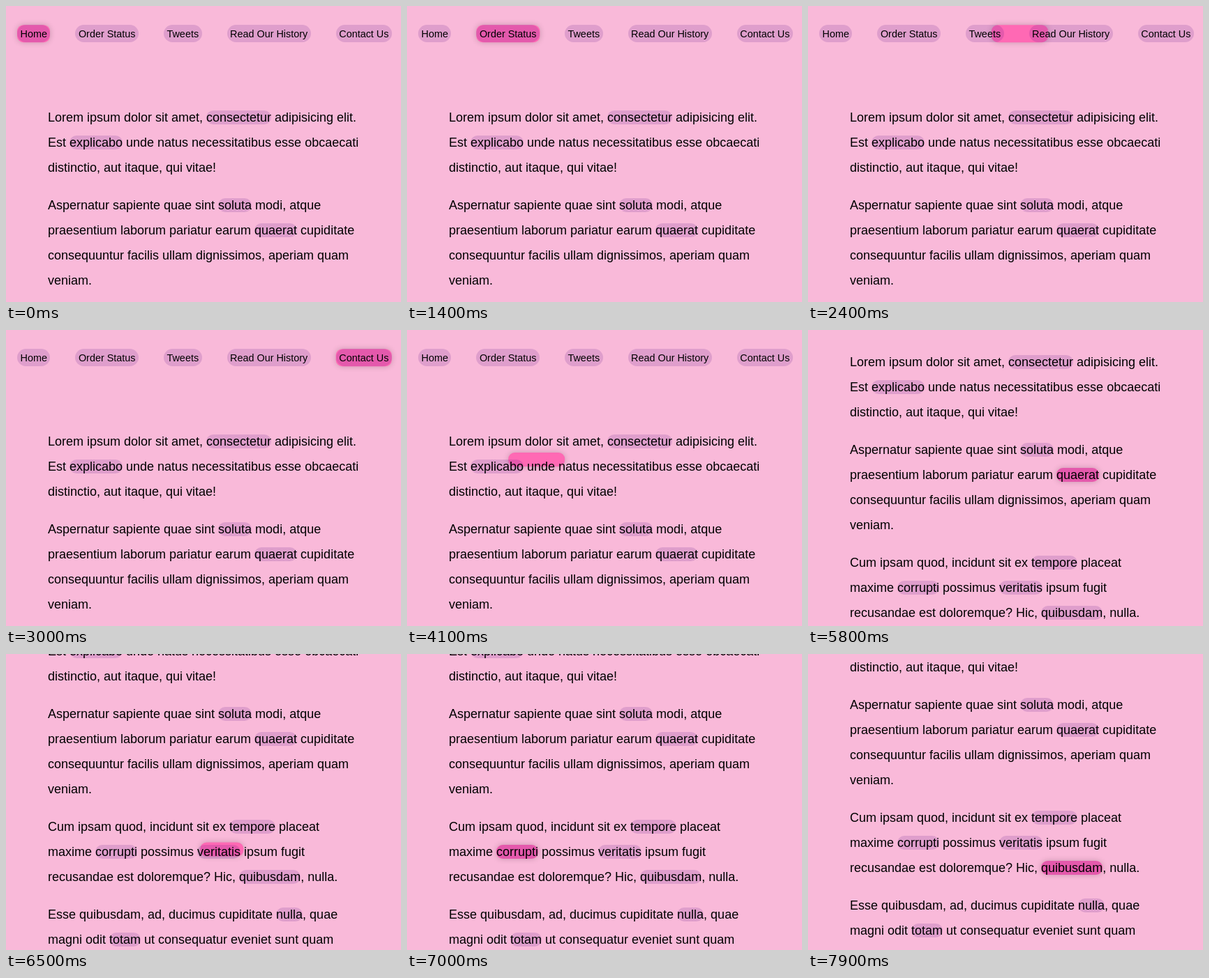
Recreate the animation shown at these times as an HTML page. Size 566 by 425 pixels, loop 8000 ms.

```html
<!DOCTYPE html>
<html lang="en">
<head>
<meta charset="utf-8">
<title>Follow-along links</title>
<style>
  html, body { margin: 0; width: 100%; height: 100%; overflow: hidden; background: #f9b9d9; }
  body { position: relative; font: 18px/36px "Liberation Sans", Arial, sans-serif; color: #000; }
  #page { position: absolute; left: 0; top: 0; width: 566px; height: 700px; isolation: isolate; }
  nav { position: absolute; left: 16px; top: 27.2px; display: flex; gap: 36px; font-size: 14.4px; line-height: 16px; white-space: nowrap; }
  nav a { padding: 4.5px; }
  main { position: absolute; left: 59.9px; top: 142px; white-space: nowrap; }
  p { margin: 0 0 18px; }
  a { color: #000; background: rgba(75, 0, 130, .15); border-radius: 18px; }
  #glow { position: absolute; left: 0; top: 0; z-index: -1; background: #ff69b4; border-radius: 9px; box-shadow: 0 0 9px rgba(0, 0, 0, .2); }
</style>
</head>
<body>
<div id="page">
  <div id="glow"></div>
  <nav><a>Home</a><a>Order Status</a><a>Tweets</a><a>Read Our History</a><a>Contact Us</a></nav>
  <main>
    <p>Lorem ipsum dolor sit amet, <a>consectetur</a> adipisicing elit.<br>
      Est <a>explicabo</a> unde natus necessitatibus esse obcaecati<br>
      distinctio, aut itaque, qui vitae!</p>
    <p>Aspernatur sapiente quae sint <a>soluta</a> modi, atque<br>
      praesentium laborum pariatur earum <a>quaerat</a> cupiditate<br>
      consequuntur facilis ullam dignissimos, aperiam quam<br>
      veniam.</p>
    <p>Cum ipsam quod, incidunt sit ex <a>tempore</a> placeat<br>
      maxime <a>corrupti</a> possimus <a>veritatis</a> ipsum fugit<br>
      recusandae est doloremque? Hic, <a>quibusdam</a>, nulla.</p>
    <p>Esse quibusdam, ad, ducimus cupiditate <a>nulla</a>, quae<br>
      magni odit <a>totam</a> ut consequatur eveniet sunt quam</p>
  </main>
</div>
<script>
const LOOP = 8000, TICK = 100, MOVE = 200;
const page = document.getElementById('page');
const glow = document.getElementById('glow');

// Each hover: start time and the link the highlight glides to
const hovers = [
  [-MOVE, 'Home'], [1150, 'Order Status'], [1814, 'Tweets'],
  [2350, 'Read Our History'], [2750, 'Contact Us'], [3350, 'consectetur'],
  [4014, 'explicabo'], [4450, 'soluta'], [5050, 'quaerat'],
  [6050, 'tempore'], [6374, 'veritatis'], [6750, 'corrupti'], [7214, 'quibusdam']
];
// Wheel notches, 100 px each
const notches = [5570, 5753, 7855];

const boxes = {};
for (const link of document.querySelectorAll('a')) {
  const r = link.getBoundingClientRect();
  boxes[link.textContent] = [r.left, r.top, r.width, r.height];
}

const clamp = x => Math.min(1, Math.max(0, x));
const smooth = x => x * x * (3 - 2 * x);
const bezier = (a, b, s) => 3 * a * s * (1 - s) ** 2 + 3 * b * s * s * (1 - s) + s ** 3;

// The CSS "ease" curve, solved by bisection
function ease(x) {
  let lo = 0, hi = 1;
  for (let i = 0; i < 24; i++) {
    const mid = (lo + hi) / 2;
    if (bezier(.25, .25, mid) < x) lo = mid; else hi = mid;
  }
  return bezier(.1, 1, hi);
}

function draw(t) {
  let box = boxes.Home;
  for (const [start, name] of hovers) {
    if (t < start) break;
    const k = ease(clamp((t - start) / MOVE));
    box = box.map((v, i) => v + (boxes[name][i] - v) * k);
  }
  const [x, y, w, h] = box;
  glow.style.transform = `translate(${x}px, ${y}px)`;
  glow.style.width = w + 'px';
  glow.style.height = h + 'px';

  const scroll = notches.reduce((sum, s) => sum + 100 * smooth(clamp((t - s) / MOVE)), 0);
  page.style.top = -Math.round(scroll) + 'px';
}

const begin = performance.now();
function loop() {
  const t = (performance.now() - begin) % LOOP;
  draw(Math.floor(t / TICK) * TICK);
  requestAnimationFrame(loop);
}
loop();
</script>
</body>
</html>
```
